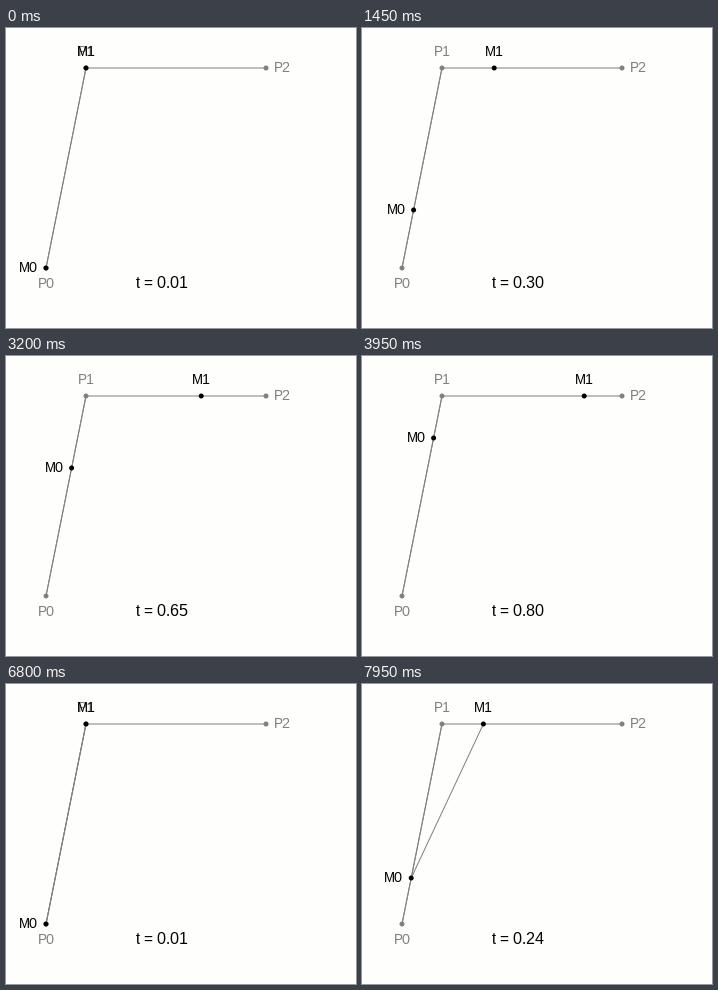
A matplotlib script for the animation above (8000 ms loop, 350x300 px).

```python
import matplotlib.pyplot as plt
import numpy as np
from matplotlib.animation import FuncAnimation
from matplotlib.patches import Circle

W, H, DPI = 350, 300, 100
STEP = 50              # ms per frame
FRAMES = 160
RUN_END = 100          # first run reaches the end points here
RESTART = 136          # second run, with the connecting segment
GRAY, BLACK = "#808080", "#000000"

P0, P1, P2 = np.array([[40, 240], [80, 40], [260, 40]], float)

# whole-pixel glyph advances
plt.rcParams.update({"font.family": "Liberation Sans",
                     "text.hinting": "native", "text.hinting_factor": 1})
fig = plt.figure(figsize=(W / DPI, H / DPI), dpi=DPI, facecolor="#fefefc")
ax = fig.add_axes([0, 0, 1, 1])
ax.set_xlim(0, W)
ax.set_ylim(H, 0)
ax.axis("off")


def path(*points):
    x, y = np.transpose(points)
    line, = ax.plot(x, y, color=GRAY, lw=72 / DPI, snap=False,
                    solid_capstyle="butt", solid_joinstyle="miter", zorder=1)
    return line


def dot(p, color, z):
    return ax.add_patch(Circle(p, 2.5, fc=color, lw=0, zorder=z))


def label(x, y, s, color, ha="center", px=14, z=2):
    return ax.text(x, y, s, color=color, ha=ha, va="baseline",
                   fontsize=px * 72 / DPI, zorder=z)


# the first leg is stroked twice, which makes it heavier
path(P0, P1)
path(P0, P1, P2)
for p in (P0, P1, P2):
    dot(p, GRAY, 2)
label(P0[0], 260, "P0", GRAY)
label(P1[0], 28, "P1", GRAY)
label(P2[0] + 8, 44, "P2", GRAY, ha="left")

link = path(P0, P1)
dots = [dot(P0, BLACK, 3), dot(P1, BLACK, 3)]
name0 = label(0, 0, "M0", BLACK, ha="right", z=4)
name1 = label(0, 0, "M1", BLACK, z=4)
readout = label(130, 260, "", BLACK, ha="left", px=16, z=4)


def draw(i):
    second = i >= RESTART
    n = i - RESTART if second else min(i, RUN_END)
    u = n / 100
    m0 = P0 + (P1 - P0) * u
    m1 = P1 + (P2 - P1) * u
    dots[0].center, dots[1].center = m0, m1
    name0.set_position((m0[0] - 8, m0[1] + 4))
    name1.set_position((m1[0], m1[1] - 12))
    link.set_data([m0[0], m1[0]], [m0[1], m1[1]])
    link.set_visible(second)
    # the counter runs one step ahead of the points
    readout.set_text(f"t = {min(n + 1, 100) / 100:.2f}")
    return [link, *dots, name0, name1, readout]


anim = FuncAnimation(fig, draw, frames=FRAMES, interval=STEP,
                     repeat=True, repeat_delay=0, blit=False)
plt.show()
```
